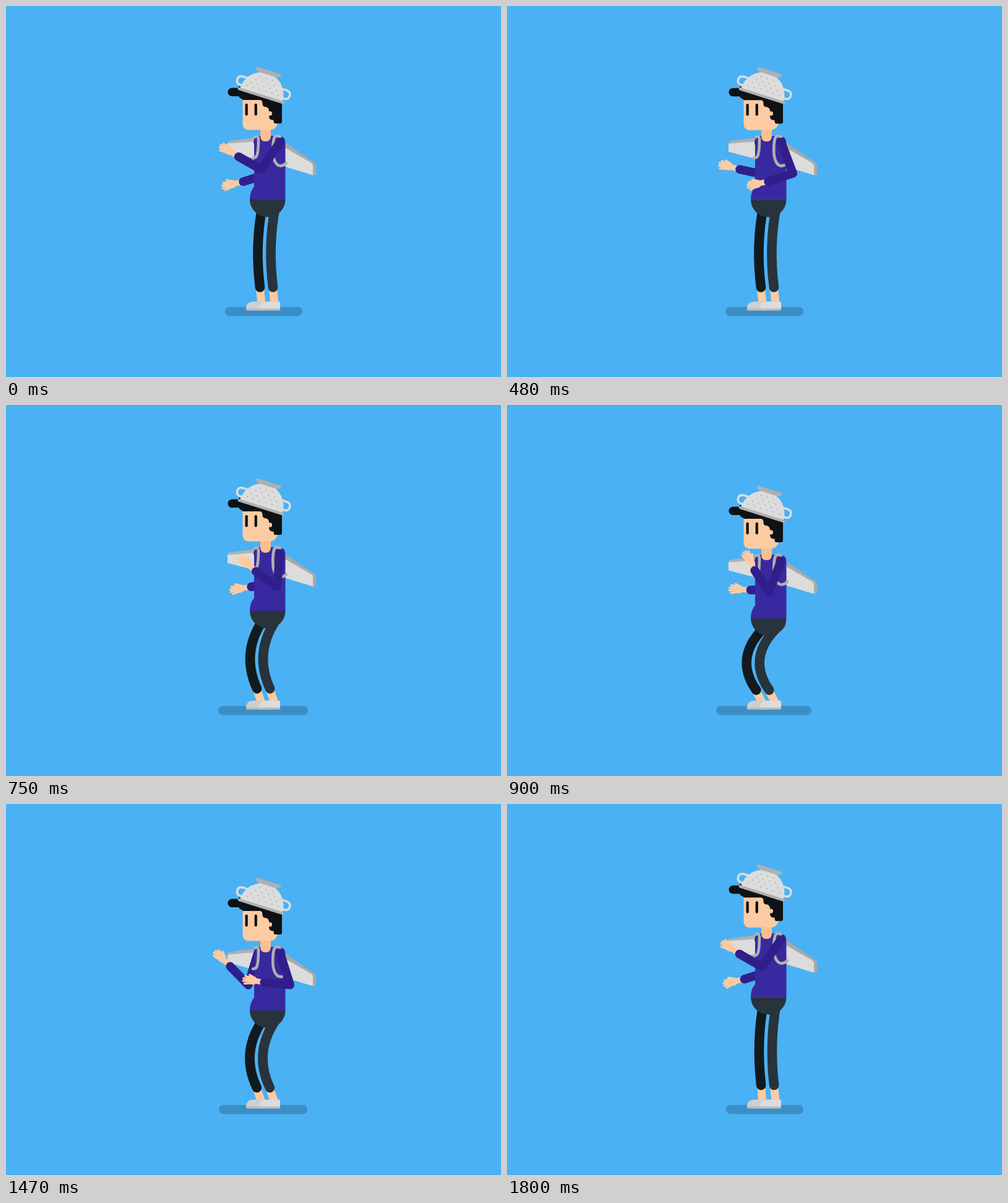
Animation of 800x600 px, one loop 1.83 s. Source, as an HTML page with a canvas:

```html
<!DOCTYPE html>
<html lang="en">
<head>
<meta charset="utf-8">
<title>Colander pilot</title>
<style>
html, body { margin: 0; width: 100%; height: 100%; overflow: hidden; background: #4ab1f4; }
canvas { display: block; }
</style>
</head>
<body>
<canvas id="stage" width="800" height="600"></canvas>
<script>
const c = document.getElementById('stage').getContext('2d');
const LOOP = 1830;
const SKIN = '#fdcba2', SHIRT = '#3929a0', SLEEVE = '#301f8a', HAIR = '#0e1214';
const PANTS = '#29333b', BACK_PANTS = '#131a1d', STEEL = '#dcdcdc', GREY = '#b0b0b0';

// Smooth periodic curve through the values v at the times t.
function curve(t, v, now) {
  const n = t.length;
  const at = i => t[(i + n) % n] + LOOP * Math.floor(i / n);
  const val = i => v[(i + n) % n];
  const slope = i => (val(i + 1) - val(i - 1)) / (at(i + 1) - at(i - 1));
  let i = n - 1;
  while (t[i] > now) i--;
  const d = at(i + 1) - at(i), u = (now - at(i)) / d, w = 1 - u;
  return val(i) * (1 + 2 * u) * w * w + slope(i) * d * u * w * w
    + val(i + 1) * u * u * (3 - 2 * u) - slope(i + 1) * d * u * u * w;
}

const BODY_T = [0, 240, 540, 630, 900, 1170, 1470, 1620, 1680, 1800];
const DROP = [0, 0, 1, 8, 32, 28, 21, -3, -5, -0.7];
const SPREAD = [0, 0, 1.5, 6, 16, 16, 10, 0, -1, 0];

// Angles in degrees: upper arm, forearm, hand.
const ARM_T = [0, 240, 630, 900, 1170, 1470, 1800];
const FRONT = [
  [124.6, 67.4, 79.5, 111, 71.6, 72.6, 125],
  [209.6, 131.4, 191.8, 236.3, 194.7, 185.6, 210],
  [211.5, 138, 197, 243, 196, 189, 215]
];
const BACK = [
  [72.4, 102, 63, 58, 110.8, 106.7, 72],
  [162.5, 224, 170, 178, 234.8, 226, 162.5],
  [167, 230, 172, 184, 235, 225, 167]
];

function fill(d, color) {
  c.fillStyle = color;
  c.fill(new Path2D(d));
}

function line(d, color, width, cap = 'round') {
  c.strokeStyle = color;
  c.lineWidth = width;
  c.lineCap = cap;
  c.lineJoin = 'round';
  c.stroke(new Path2D(d));
}

function bar(x, y, w, h, r, color) {
  c.fillStyle = color;
  c.beginPath();
  c.roundRect(x, y, w, h, r);
  c.fill();
}

function dot(x, y, r, color) {
  c.fillStyle = color;
  c.beginPath();
  c.arc(x, y, r, 0, 7);
  c.fill();
}

function placed(x, y, angle, draw) {
  c.save();
  c.translate(x, y);
  c.rotate(angle * Math.PI / 180);
  draw();
  c.restore();
}

function hand() {
  line('M2 0H16', SKIN, 9, 'butt');
  bar(12.5, -6.5, 12.5, 12.5, 5, SKIN);
  line('M21 -4.6L31 -6.8M22 -1.6L34 -2.9M22 1.4L34 1.2M21 3.8L31.5 5.2M15 4L25 8', SKIN, 3.6);
}

function arm(x, y, angles, now) {
  const [a, b, h] = angles.map(v => curve(ARM_T, v, now));
  const step = (p, len, deg) => {
    const r = deg * Math.PI / 180;
    return [p[0] + len * Math.cos(r), p[1] + len * Math.sin(r)];
  };
  const elbow = step([x, y], 54, a), wrist = step(elbow, 42, b);
  placed(...wrist, h, hand);
  line(`M${x} ${y}L${elbow}L${wrist}`, SLEEVE, 14);
}

function leg(x, dy, color, shoe) {
  c.save();
  c.translate(x, 0);
  const ax = 431.5 - 0.24 * dy, ay = 455 + 0.19 * dy;
  line(`M${ax} ${ay + 2}L434 482`, SKIN, 13, 'butt');
  line(`M${435.5 + 0.2 * dy} ${323 + dy}Q${422.9 - 1.18 * dy} ${387 + 0.6 * dy} ${ax} ${ay}`, color, 15.6);
  fill('M441 478Q443 478 443 480V492H409V488Q410 478 422 478Z', shoe);
  fill('M409 489H443V491Q443 492.5 441 492.5H411Q409 492.5 409 491Z', '#bdbdbd');
  c.restore();
}

function wings() {
  fill('M358 224V221Q359 218.5 364 217.8L402 213V222Z', GREY);
  fill('M358 222.5L402 219V247L358 235.5Z', STEEL);
  fill('M450 220L497 252Q501 255 501 259V271Q501 274 497 273.5L450 245Z', '#a9a9a9');
  fill('M450 228.5L493 253.5Q496 255.5 496 259V273.4L450 259.5Z', STEEL);
}

function torso() {
  fill('M401 213Q401 210 404 210H442Q451.5 211 451.5 222V313H394Q394 300 401 292Z', SHIRT);
  fill('M394 313H451.5A28.7 28.3 0 0 1 394 313Z', PANTS);
  fill('M411 195H428V210Q428 219 419.5 219Q411 219 411 210Z', '#f8bf93');
  line('M402 212Q407 208.5 408 215Q408 230 406.5 238Q405 246.5 399 245.5', GREY, 4.5);
  line('M443 212Q437 207.5 433.5 213Q430.5 222 431.5 240Q434 258 444 258.5Q449 258 453 254', GREY, 4.6);
}

function colander() {
  for (const side of [-1, 1]) {
    c.save();
    c.scale(side, 1);
    line('M31 -17.5H37.5Q44.5 -17 44.5 -10.5Q44.5 -3.5 37.5 -3.5H33', STEEL, 3.6);
    c.restore();
  }
  fill('M-36 2A36 37 0 0 1 36 2Z', STEEL);
  fill('M-20 -39.5H20Q22.5 -38 20.5 -36L16 -32.5H-16L-20.5 -36Q-22.5 -38 -20 -39.5Z', GREY);
  bar(-39, 1, 78, 4.5, 2, GREY);
  for (let row = 0; row < 4; row++) {
    const n = 6 - row;
    for (let i = 0; i < n; i++) dot((i - (n - 1) / 2) * 10.5, -6 - row * 6.6, 1.1, GREY);
  }
}

function head(now) {
  bar(382.5, 142, 56.5, 58.5, [0, 0, 13, 9], SKIN);
  bar(358.5, 132.5, 34, 13.5, 6.7, HAIR);
  fill('M376 130H410L446 150V187Q446 190 443 190H435Q432.5 190 432.5 184.5Q425 185 425 178'
    + 'V168.5Q424 163 418 163Q414 162 414.5 157Q414 152 410 152'
    + 'H384Q382 152 381 150Q376 149 376 144Z', HAIR);
  dot(426.5, 173.8, 3.6, SKIN);
  const shut = Math.max(0, 1 - Math.abs(now - 1175) / 90);
  const h = 19.5 - 12 * shut;
  for (const x of [386.5, 401.6]) bar(x, 167.6 - h / 2, 4.3, h, 2.1, HAIR);
  placed(413, 142, 17.5, colander);
}

function draw(now) {
  const dy = curve(BODY_T, DROP, now), wide = curve(BODY_T, SPREAD, now);
  c.fillStyle = '#4ab1f4';
  c.fillRect(0, 0, 800, 600);
  bar(354 - wide, 486.7, 125 + 1.82 * wide, 14.8, 7.4, '#3b8ec5');

  const lowered = part => placed(0, dy, 0, part);
  lowered(wings);
  lowered(() => arm(407, 220, BACK, now));
  leg(-21, dy, BACK_PANTS, '#cfcfcf');
  leg(0, dy, PANTS, STEEL);
  lowered(() => {
    torso();
    head(now);
    arm(443, 220, FRONT, now);
  });
}

let start;
function tick(t) {
  start ??= t;
  draw((t - start) % LOOP);
  requestAnimationFrame(tick);
}
draw(0);
requestAnimationFrame(tick);
</script>
</body>
</html>
```
